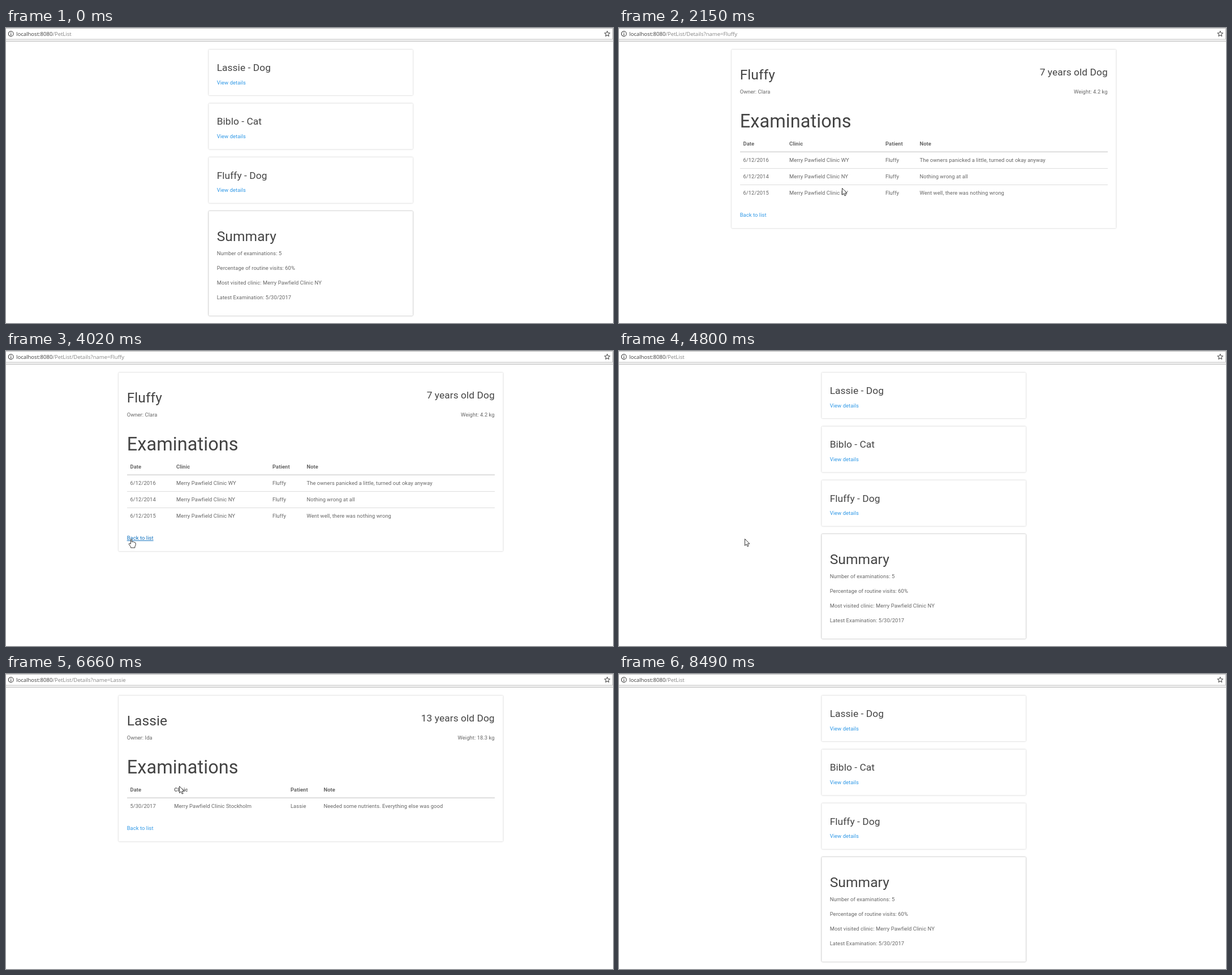
Animation, 1073 px wide and 522 px high, one loop 9.19 s. Source, as an HTML page:

```html
<!DOCTYPE html>
<html lang="en">
<head>
<meta charset="utf-8">
<title>Pet list</title>
<style>
html, body { margin: 0; width: 100%; height: 100%; overflow: hidden; background: #fff; }
svg { display: block; width: 1073px; height: 522px; }
text { font: 9.39px Roboto, sans-serif; letter-spacing: .07px; fill: #666; white-space: pre; }
.h2 { font-size: 32.5px; fill: #444; }
.h3 { font-size: 24.55px; fill: #444; }
.h4 { font-size: 17.33px; fill: #444; }
.th { font-weight: 700; }
.end { text-anchor: end; }
.link { fill: #2f98e6; }
.link.hover { fill: #0a6ebd; text-decoration: underline; }
.url { font: 9.55px "Open Sans", "Noto Sans", sans-serif; letter-spacing: 0; fill: #3c3c3c; }
.url #path { fill: #858585; }
.card { fill: #fff; filter: drop-shadow(0 .9px .8px rgba(0,0,0,.27)); }
.summary .card { filter: drop-shadow(0 .8px .8px rgba(0,0,0,.45)); }
</style>
</head>
<body>
<svg viewBox="0 0 1073 522">
  <g id="pages"></g>
  <g fill="none">
    <path d="M0 21h1073v2H0z" fill="#f4f4f4"/>
    <path d="M0 .5H1072.5V20H0M0 23.5H1073" stroke="#bababa"/>
    <circle cx="8.7" cy="10.2" r="4.4" stroke="#444" stroke-width="1.1"/>
    <path d="M8.7 7.3v1.3M8.7 9.5v3.4" stroke="#444" stroke-width="1.2"/>
    <path id="star" stroke="#555" stroke-width="1.1" stroke-linejoin="round"/>
  </g>
  <text class="url" x="18" y="13.6">localhost:8080<tspan id="path"></tspan></text>
  <g id="cursor" stroke="#222" stroke-width=".9" fill="#fff" stroke-linejoin="round">
    <path id="arrow" d="M.5 .5V12.4L3.2 9.8L5.1 14L7 13.1L5.2 9.1H8.9Z"/>
    <path id="hand" d="M-.9 9.2V1.2Q0-.5 1 1.2V5.6Q4.7 4.7 5.5 6.6Q7.3 6 7.8 7.8V11.2L6.5 14V16H-.8V14.3L-4.2 9.6Q-3.8 7.6-2.2 8.5Z"/>
  </g>
</svg>
<script>
const LOOP = 9190, STEP = 79;
const LIST_X = 372.7, PET_X = 213.7, RIGHT = 863.7;
const $ = id => document.getElementById(id);
const label = (x, y, str, cls = "") => `<text x="${x}" y="${y}" class="${cls}">${str}</text>`;
const card = (x, y, w, h) => `<rect class="card" x="${x}" y="${y}" width="${w}" height="${h}" rx="1.4"/>`;
const rule = (y, w, color) => `<path d="M214 ${y}H864" stroke="${color}" stroke-width="${w}"/>`;
const clinic = place => "Merry Pawfield Clinic " + place;

function listPage() {
  const pets = ["Lassie - Dog", "Biblo - Cat", "Fluffy - Dog"];
  const facts = ["Number of examinations: 5", "Percentage of routine visits: 60%",
    "Most visited clinic: " + clinic("NY"), "Latest Examination: 5/30/2017"];
  const cards = pets.map((pet, i) => {
    const y = 38.2 + i * 95.33;
    return card(358.3, y, 360.8, 80.9) + label(LIST_X, y + 37.9, pet, "h4") +
      label(LIST_X, y + 61.5, "View details", "link");
  });
  return cards.join("") + `<g class="summary">${card(358.3, 324, 360.8, 185)}</g>` +
    label(LIST_X, 377, "Summary", "h3") +
    facts.map((f, i) => label(LIST_X, 402.2 + i * 26, f)).join("");
}

function petPage({ name, age, owner, weight, cols, exams }) {
  const row = (cells, y, cls) => cells.map((c, i) => label(cols[i], y, c, cls)).join("");
  const extra = (exams.length - 1) * 29;
  return card(199, 38.2, 679.5, 258 + extra) +
    label(PET_X, 90.7, name, "h3") + label(RIGHT, 84.3, age + " years old Dog", "h4 end") +
    label(PET_X, 116.2, "Owner: " + owner) + label(RIGHT, 116.2, `Weight: ${weight} kg`, "end") +
    label(PET_X, 176.4, "Examinations", "h2") +
    row(["Date", "Clinic", "Patient", "Note"], 207.8, "th") + rule(219.3, 1.5, "#d4d4d4") +
    exams.map(([date, place, note], i) => row([date, clinic(place), name, note], 237.4 + i * 29) +
      (i ? rule(219.5 + i * 29, 1, "#ddd") : "")).join("") +
    label(PET_X, 276.2 + extra, "Back to list", "link");
}

const fluffy = {
  name: "Fluffy", age: 7, owner: "Clara", weight: "4.2", cols: [219.5, 301, 471, 531.5],
  exams: [["6/12/2016", "WY", "The owners panicked a little, turned out okay anyway"],
    ["6/12/2014", "NY", "Nothing wrong at all"],
    ["6/12/2015", "NY", "Went well, there was nothing wrong"]]
};
const lassie = {
  name: "Lassie", age: 13, owner: "Ida", weight: "18.3", cols: [219.5, 297.3, 503, 561.5],
  exams: [["5/30/2017", "Stockholm", "Needed some nutrients. Everything else was good"]]
};
$("pages").innerHTML = [listPage(), petPage(fluffy), petPage(lassie)].map(p => `<g>${p}</g>`).join("");
const pages = [...$("pages").children];
const paths = ["", ...[fluffy, lassie].map(p => "/Details?name=" + p.name)].map(p => "/PetList" + p);

$("star").setAttribute("d", "M" + Array.from({ length: 10 }, (_, i) => {
  const r = i % 2 ? 2.3 : 5, a = i * Math.PI / 5;
  return [1062.8 + r * Math.sin(a), 10.4 - r * Math.cos(a)].map(v => v.toFixed(2));
}).join("L") + "Z");

// [start, page]
const visits = [[0, 0], [2090, 1], [4800, 0], [6050, 2], [7540, 0]];

// [start, end, from, bend, to]: each move is an eased quadratic curve
const moves = [
  [200, 1050, [953, 514], [600, 420], [437, 371]],
  [1150, 1920, [442, 340], [507, 212], [394, 283]],
  [3070, 4110, [394, 284], [165, 345], [222, 332]],
  [4950, 5820, [224, 329], [310, 205], [380, 99]],
  [6430, 7300, [372, 110], [295, 213], [248, 276]],
  [7540, 8400, [248, 276], [600, 385], [994, 519]]
];
const GONE = 8490;

const current = (table, t) => table.findLast(e => e[0] <= t);

function cursorAt(t) {
  const move = current(moves, t);
  if (!move || t >= GONE) return null;
  const [start, end, from, bend, to] = move;
  const steps = Math.round((end - start) / STEP);
  const p = Math.min(1, Math.floor((t - start) / (end - start) * steps + .2) / steps);
  const u = 1 - (1 - p) ** 2, v = 1 - u;
  return from.map((a, i) => v * v * a + 2 * u * v * bend[i] + u * u * to[i]);
}

function isOver(link, [px, py]) {
  const x = +link.getAttribute("x"), y = +link.getAttribute("y");
  return px >= x && px <= x + 51 && py >= y - 9 && py <= y + 3;
}

function draw(t) {
  const page = current(visits, t)[1], pos = cursorAt(t);
  pages.forEach((p, i) => p.style.display = i === page ? "" : "none");
  $("path").textContent = paths[page];
  let over = false;
  for (const link of pages[page].querySelectorAll(".link")) {
    const hit = !!pos && isOver(link, pos);
    link.classList.toggle("hover", hit);
    over = over || hit;
  }
  $("cursor").style.display = pos ? "" : "none";
  if (pos) $("cursor").setAttribute("transform", `translate(${pos})`);
  $("arrow").style.display = over ? "none" : "";
  $("hand").style.display = over ? "" : "none";
}

const t0 = performance.now();
function tick(now) {
  draw(Math.max(0, now - t0) % LOOP);
  requestAnimationFrame(tick);
}
draw(0);
requestAnimationFrame(tick);
</script>
</body>
</html>
```
